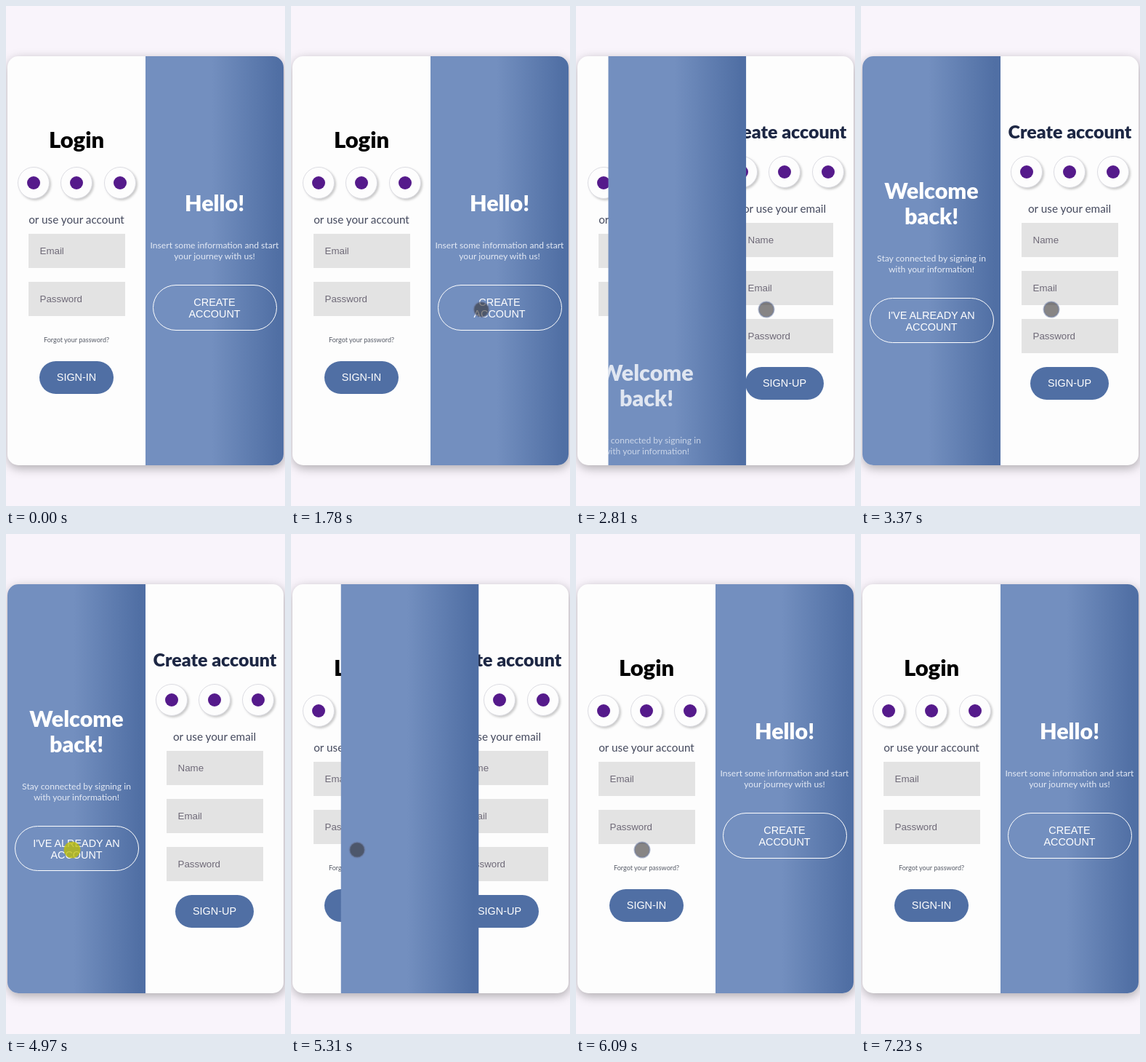
An HTML page for the animation above (7910 ms loop, 384 by 687 pixels).

```html
<!DOCTYPE html>
<html lang="en">
<head>
<meta charset="utf-8">
<title>Login slider</title>
<style>
  html, body { margin: 0; height: 100%; overflow: hidden; background: #f9f4fb; }
  #stage { display: block; width: 384px; height: 687px; }
  #card { filter: drop-shadow(1px 4px 7px rgba(0, 0, 0, .3)); }
  .disc { filter: drop-shadow(2px 2px 1.5px rgba(0, 0, 0, .2)); }
  text { text-anchor: middle; font-family: Lato, sans-serif; }
  .title { font-weight: 900; font-size: 31px; }
  .small-title { font-weight: 900; font-size: 25px; fill: #1d2744; }
  .lead { font-size: 15.3px; fill: #454a5e; }
  .note { font-size: 9.05px; fill: #555a66; }
  .hint { font: 13.333px "Liberation Sans", Arial, sans-serif; fill: #6f6a78; text-anchor: start; }
  .label { font: 14.4px "Liberation Sans", Arial, sans-serif; fill: #fff; }
  .panel-title { font-weight: 900; font-size: 30.5px; fill: #fff; }
  .panel-text { font-size: 12.1px; fill: #e4eaf5; }
</style>
</head>
<body>
<svg id="stage" viewBox="0 0 384 687">
  <defs>
    <linearGradient id="blue">
      <stop offset=".48" stop-color="#738fbf"/>
      <stop offset=".96" stop-color="#506fa4"/>
    </linearGradient>
    <clipPath id="round"><rect x="2" y="69" width="380" height="562" rx="15"/></clipPath>
  </defs>
  <rect id="card" x="2" y="69" width="380" height="562" rx="15" fill="#fdfdfd"/>
  <g id="forms"></g>
  <g clip-path="url(#round)">
    <svg id="panel" y="69" width="190" height="562">
      <rect id="fill" y="69" width="190" height="562" fill="url(#blue)"/>
      <g id="hello"></g>
      <g id="welcome"></g>
    </svg>
  </g>
  <g id="cursor">
    <circle id="dot" r="10.5" stroke-width="2"/>
  </g>
</svg>
<script>
const LOOP = 7910, SLIDE = 1000, DROP = 1124;
const TO_SIGNUP = 2335, TO_LOGIN = 5087;
const CLICKS = [[2260, 2400], [4970, 5100]];
// time, x, y
const PATH = [
  [590, 365, 680], [1360, 273, 476], [1780, 262, 417], [3630, 262, 417],
  [3940, 175, 445], [4180, 91, 434], [6820, 91, 434], [7210, 318, 715]
];

const $ = id => document.getElementById(id);
const text = (kind, x, y, s) => `<text class="${kind}" x="${x}" y="${y}">${s}</text>`;
const badge = (x, y) =>
  `<circle class="disc" cx="${x}" cy="${y}" r="21.5" fill="#fdfdfd" stroke="#dcdce2"/>
   <circle cx="${x}" cy="${y}" r="9" fill="#551a8b"/>`;
const badges = (x, y) => [0, 59, 119].map(dx => badge(x + dx, y)).join('');
const field = (x, y, s) =>
  `<rect x="${x}" y="${y}" width="133" height="47" fill="#e3e3e3"/>` + text('hint', x + 15.5, y + 28, s);
const button = (x, y, w, s) =>
  `<rect x="${x}" y="${y}" width="${w}" height="45" rx="22.5" fill="#506fa4"/>` +
  text('label', x + w / 2, y + 27, s);
const ghost = (x, y, h, a, b) =>
  `<rect x="${x + .5}" y="${y + .5}" width="170" height="${h - 1}" rx="${h / 2}" fill="none" stroke="#fff"/>` +
  text('label', x + 85, y + 28.5, a) + text('label', x + 85, y + 44.5, b);

$('forms').innerHTML =
  text('title', 97, 195, 'Login') + badges(38, 243) +
  text('lead', 97, 299, 'or use your account') +
  field(31, 313, 'Email') + field(31, 379, 'Password') +
  text('note', 97, 462, 'Forgot your password?') + button(46, 488, 102, 'SIGN-IN') +
  text('small-title', 287.5, 182, 'Create account') + badges(228, 228) +
  text('lead', 287, 284, 'or use your email') +
  field(221, 298, 'Name') + field(221, 364, 'Email') + field(221, 430, 'Password') +
  button(233, 496, 108, 'SIGN-UP');

$('hello').innerHTML =
  text('panel-title', 287, 282, 'Hello!') +
  text('panel-text', 287, 333, 'Insert some information and start') +
  text('panel-text', 287, 348, 'your journey with us!') +
  ghost(202, 383, 63, 'CREATE', 'ACCOUNT');

$('welcome').innerHTML =
  text('panel-title', 97, 265, 'Welcome') + text('panel-title', 97, 300, 'back!') +
  text('panel-text', 97, 351, 'Stay connected by signing in') +
  text('panel-text', 97, 366, 'with your information!') +
  ghost(12, 401, 62, "I'VE ALREADY AN", 'ACCOUNT');

// cubic-bezier(.25, .1, .25, 1)
function ease(t) {
  if (t <= 0) return 0;
  if (t >= 1) return 1;
  const bezier = (u, a, b) => 3 * a * u * (1 - u) ** 2 + 3 * b * u * u * (1 - u) + u ** 3;
  let low = 0, high = 1;
  for (let i = 0; i < 24; i++) {
    const mid = (low + high) / 2;
    if (bezier(mid, .25, .25) < t) low = mid; else high = mid;
  }
  return bezier(low, .1, 1);
}

function placeCursor(t) {
  const i = PATH.findIndex((p, k) => k && t >= PATH[k - 1][0] && t < p[0]);
  $('cursor').style.display = i < 0 ? 'none' : '';
  if (i < 0) return;
  const [t0, x0, y0] = PATH[i - 1], [t1, x1, y1] = PATH[i];
  const k = (t - t0) / (t1 - t0);
  $('cursor').setAttribute('transform', `translate(${x0 + (x1 - x0) * k} ${y0 + (y1 - y0) * k})`);
  const pressed = CLICKS.some(([from, to]) => t >= from && t < to);
  $('dot').setAttribute('fill', pressed ? 'rgba(190,190,0,.75)' : 'rgba(50,46,46,.58)');
  $('dot').setAttribute('stroke', pressed ? 'rgba(190,190,20,.7)' : 'rgba(110,125,165,.5)');
}

function placeText(id, shown) {
  $(id).setAttribute('transform', `translate(0 ${DROP * (1 - shown)})`);
  $(id).setAttribute('opacity', shown);
}

function draw() {
  const t = performance.now() % LOOP;
  const p = ease((t - TO_SIGNUP) / SLIDE) - ease((t - TO_LOGIN) / SLIDE);
  const left = 192 - 190 * p;
  $('panel').setAttribute('x', left);
  $('panel').setAttribute('viewBox', `${left} 69 190 562`);
  $('fill').setAttribute('x', left);
  placeText('hello', 1 - p);
  placeText('welcome', p);
  placeCursor(t);
  requestAnimationFrame(draw);
}
draw();
</script>
</body>
</html>
```
